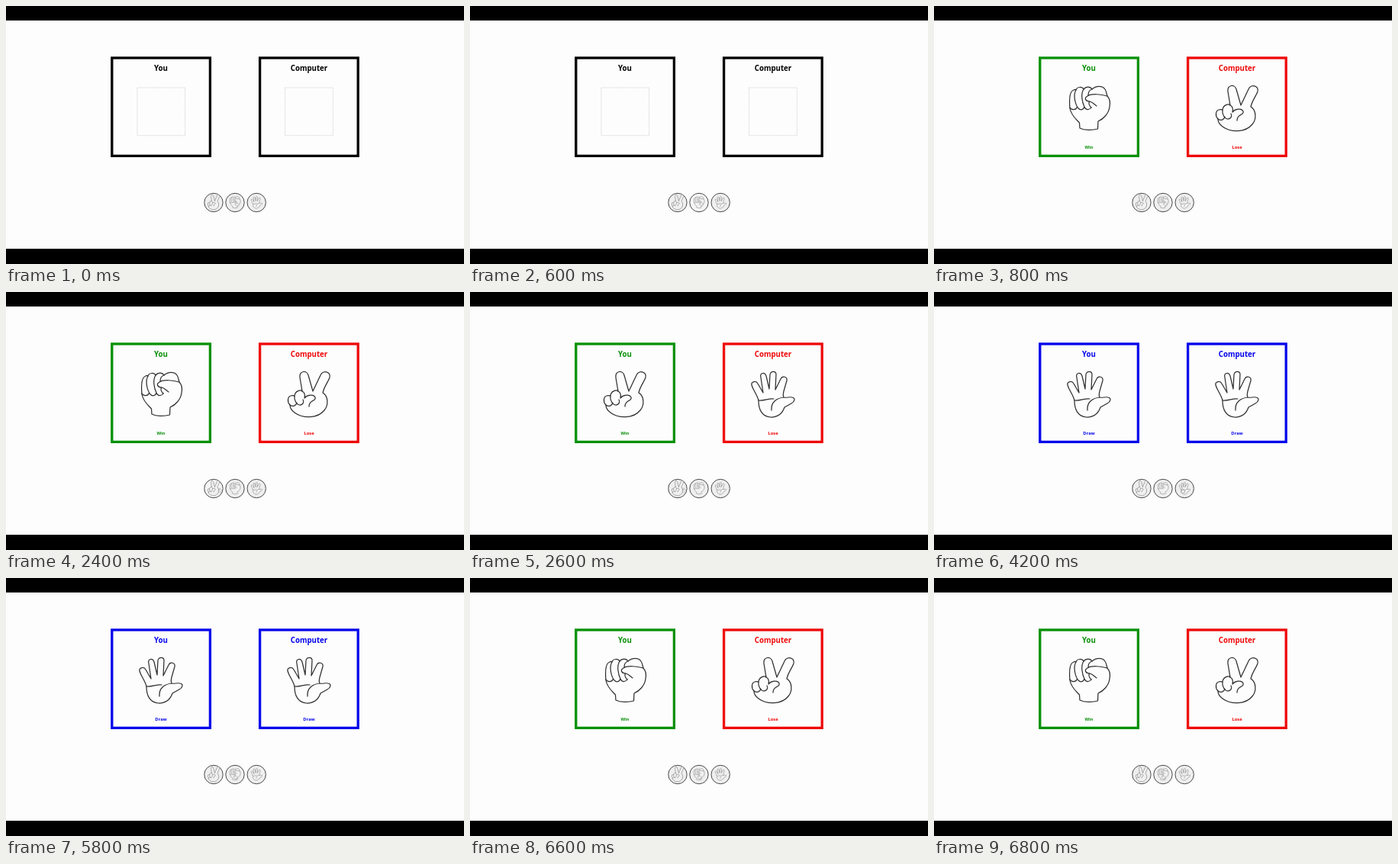
An HTML page for the animation above (7800 ms loop, 600 by 338 pixels).

```html
<!DOCTYPE html>
<html lang="en">
<head>
<meta charset="utf-8">
<title>Rock, scissors, paper</title>
<style>
html, body { margin: 0; width: 100%; height: 100%; overflow: hidden; background: #000; }
svg { display: block; width: 600px; height: 338px; }
text { font-family: "Open Sans", "Noto Sans", sans-serif; font-weight: 700; text-anchor: middle; fill: currentColor; }
.title { font-size: 9.7px; }
.result { font-size: 5.8px; }
.frame { fill: none; stroke: currentColor; stroke-width: 3.3; }
.hand { fill: #fdfdfd; stroke: #303030; stroke-width: 1.25; stroke-linecap: round; stroke-linejoin: round; }
.icon { fill: #f1f1f1; stroke: #707070; stroke-width: 1.9; }
.line { fill: none; }
.slot { fill: none; stroke: #d6d6d6; stroke-width: .8; stroke-dasharray: 1.6 .5; }
.win { color: #079007; }
.lose { color: #ef0909; }
.draw { color: #0505ec; }
.idle .frame { stroke: #808080; }

.state, .cursor, .press { animation: 7800ms step-end infinite; }
.state { visibility: hidden; }
.idle { animation-name: idle; }
.rock { animation-name: rock; }
.scissors { animation-name: scissors; }
.paper { animation-name: paper; }
.cursor { animation-name: move; }
.press { fill: #efefef; }
.press.r { animation-name: press-rock; }
.press.s { animation-name: press-scissors; }

@keyframes idle { 0% { visibility: visible } 10.256%, 100% { visibility: hidden } }
@keyframes rock {
  0%, 33.333% { visibility: hidden }
  10.256%, 84.615%, 100% { visibility: visible }
}
@keyframes scissors { 0%, 53.846%, 100% { visibility: hidden } 33.333% { visibility: visible } }
@keyframes paper { 0%, 84.615%, 100% { visibility: hidden } 53.846% { visibility: visible } }
@keyframes press-rock { 0%, 10.256%, 100% { fill: #efefef } 7.692% { fill: #f5f5f5 } }
@keyframes press-scissors { 0%, 33.333%, 100% { fill: #efefef } 30.769% { fill: #f5f5f5 } }
@keyframes move {
  0% { transform: translate(299.5px, 256px) }
  2.564% { transform: translate(300px, 255.5px) }
  23.076% { transform: translate(285.5px, 256.5px) }
  25.641% { transform: translate(277.5px, 256.5px) }
  43.589% { transform: translate(285.5px, 257px) }
  46.153% { transform: translate(317px, 257px) }
  48.717% { transform: translate(323px, 257px) }
  64.102% { transform: translate(321px, 257px) }
  66.666% { transform: translate(317px, 257px) }
  69.23% { transform: translate(310px, 257px) }
  71.794% { transform: translate(299.5px, 257px) }
  74.358%, 100% { transform: translate(297.5px, 257px) }
}
</style>
</head>
<body>
<svg viewBox="0 0 600 338">
  <defs>
    <!-- hands are drawn around the panel centre -->
    <g id="rock">
      <path d="M-12 22 L-12.5 15 C-17 10 -23 6 -25 -4 C-26 -15 -26 -26 -20 -28 C-18 -29 -17 -28 -17 -28 C-16 -32 -9 -33 -7 -29 C-4 -33 2 -33 4 -29 C9 -34 18 -34 21 -29 C23 -26 23 -23 24 -20 C27 -17 28 -11 27 -6 C26 3 19 10 12 13 L11.5 23 C4 25 -6 25 -12 22Z"/>
      <path class="line" d="M-25 -5 C-22 -1 -17 -2 -16 -5 M-17 -28 C-21 -21 -18 -9 -14 -4 C-11 -1 -7 -2 -6 -6 M-7 -29 C-11 -23 -9 -12 -6 -6 C-4 -1 1 -2 3 -5 M4 -29 C1 -28 -1 -25 -1 -21"/>
      <path class="line" d="M24 -20 C17 -22 4 -24 -2 -20 C-7 -17 -4 -13 1 -13 C5 -12 7 -9 10 -7 M1 -13 C-1 -11 0 -8 3 -5"/>
    </g>
    <g id="scissors">
      <path d="M-9 -8 L-12 -26 C-13 -35 -3 -36 -1 -29 L5 -8 L15 -29 C18 -36 29 -34 27 -26 C25 -20 20 -15 18 -6 C25 -2 26 10 20 17 C11 28 -8 28 -19 20 C-23 17 -25 14 -25 10 C-29 6 -28 -1 -24 -2 C-22 -3 -20 -2 -19 -2 C-18 -9 -11 -10 -9 -8Z"/>
      <path class="line" d="M-25 10 C-21 13 -17 11 -16 7 M-19 -2 C-20 4 -16 10 -12 10 C-8 10 -6 6 -8 3 M-9 -8 C-5 -6 -5 -3 -6 1 C-3 -3 6 -5 8 0 C9 3 6 4 4 5 C1 7 0 9 0 12"/>
    </g>
    <g id="paper">
      <path d="M-19 4 C-21 -4 -26 -9 -28 -16 C-29 -21 -22 -22 -20 -18 L-13 -6 L-16 -26 C-18 -32 -11 -34 -9 -28 L-5 -11 L-4 -30 C-3 -35 4 -35 4 -30 L3 -10 L10 -24 C12 -29 19 -27 18 -22 L14 -8 C13 -4 13 -2 14 0 C18 1 21 -1 25 0 C30 1 28 6 24 8 L15 13 C12 22 6 26 -3 26 C-14 25 -19 17 -19 4Z"/>
      <path class="line" d="M-19 4 C-11 5 -6 1 1 2 M14 0 C5 1 -3 6 -2 17"/>
    </g>
    <g id="you">
      <rect class="frame" x="138.8" y="68" width="128.6" height="128.4"/>
      <text class="title" x="203" y="84.8">You</text>
    </g>
    <g id="pc">
      <rect class="frame" x="332.6" y="68" width="128.6" height="128.4"/>
      <text class="title" x="397" y="84.8">Computer</text>
    </g>
  </defs>

  <rect width="600" height="338"/>
  <rect y="19" width="600" height="299" fill="#fdfdfd"/>

  <g class="state idle">
    <use href="#you"/><use href="#pc"/>
    <rect class="slot" x="171.9" y="107" width="62.7" height="62.7"/>
    <rect class="slot" x="365.6" y="107" width="62.7" height="62.7"/>
  </g>

  <g class="state rock">
    <g class="win"><use href="#you"/><text class="result" x="203" y="187.4">Win</text></g>
    <g class="lose"><use href="#pc"/><text class="result" x="397" y="187.4">Lose</text></g>
    <use class="hand" href="#rock" x="203" y="138"/>
    <use class="hand" href="#scissors" x="397" y="138"/>
  </g>

  <g class="state scissors">
    <g class="win"><use href="#you"/><text class="result" x="203" y="187.4">Win</text></g>
    <g class="lose"><use href="#pc"/><text class="result" x="397" y="187.4">Lose</text></g>
    <use class="hand" href="#scissors" x="203" y="138"/>
    <use class="hand" href="#paper" x="397" y="138"/>
  </g>

  <g class="state paper draw">
    <use href="#you"/><text class="result" x="203" y="187.4">Draw</text>
    <use href="#pc"/><text class="result" x="397" y="187.4">Draw</text>
    <use class="hand" href="#paper" x="203" y="138"/>
    <use class="hand" href="#paper" x="397" y="138"/>
  </g>

  <g stroke="#484848">
    <circle class="press s" cx="272" cy="257.5" r="12.2"/>
    <circle class="press r" cx="300" cy="257.5" r="12.2"/>
    <circle class="press" cx="328.2" cy="257.5" r="12.2"/>
  </g>
  <use class="icon" href="#scissors" transform="translate(272 258.3) scale(.28 .33)"/>
  <use class="icon" href="#rock" transform="translate(300 258.3) scale(.26)"/>
  <use class="icon" href="#paper" transform="translate(328.4 258.3) scale(.26)"/>

  <path class="cursor" d="M1.6 3.6 V.8 Q2.2 0 2.8 .8 V2.4 L5 3 Q5.6 3.2 5.4 4 L4.8 6 H2.2 L.5 3.8 Q.8 3 1.6 3.6Z" fill="#fafafa" stroke="#777" stroke-width=".5"/>
</svg>
</body>
</html>
```
